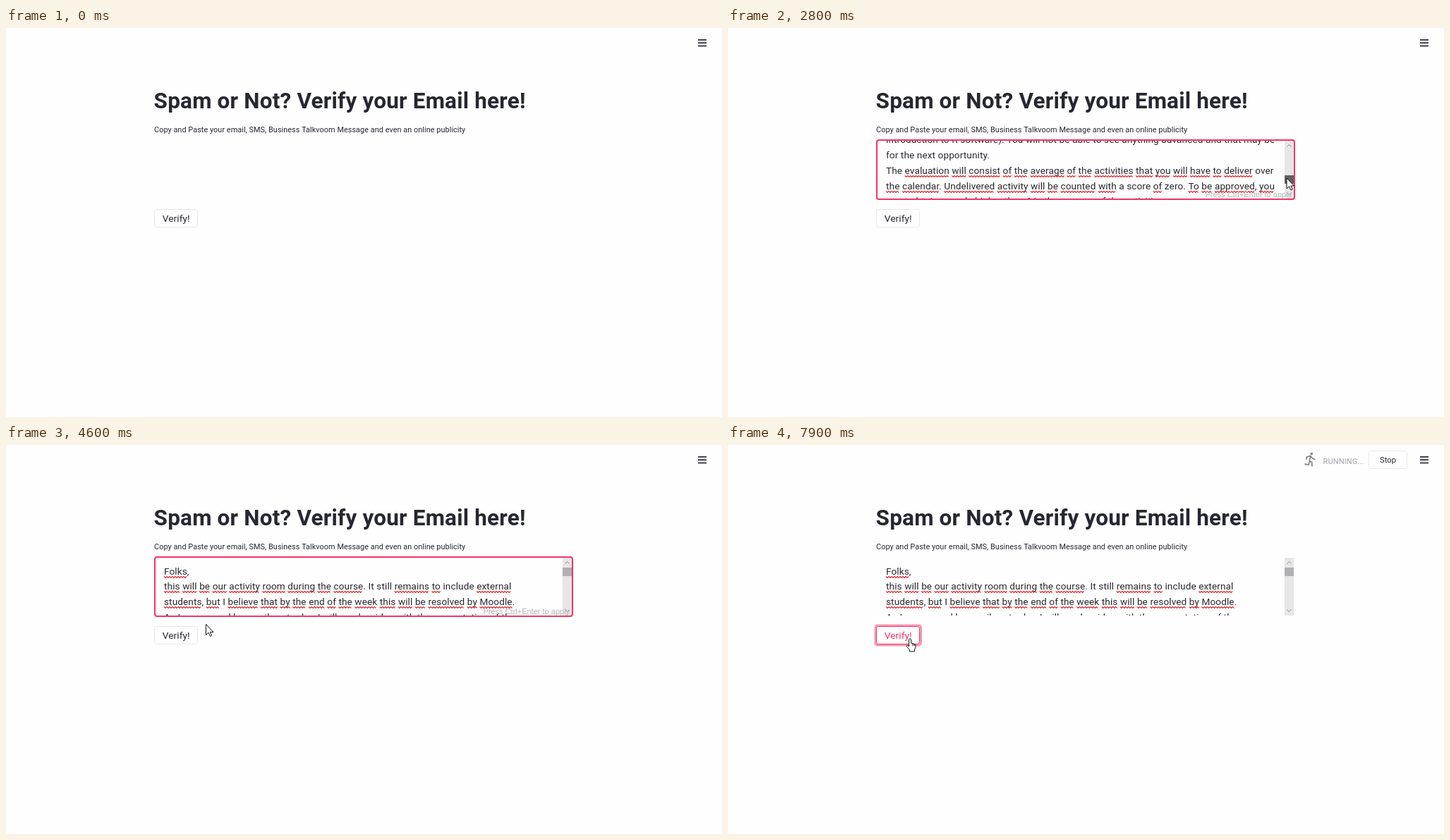
An HTML page with a canvas for the animation above (8000 ms loop, 1015 by 552 pixels).

```html
<!DOCTYPE html>
<html lang="en">
<head>
<meta charset="utf-8">
<title>Spam or Not?</title>
<style>
html, body { margin: 0; width: 100%; height: 100%; overflow: hidden; background: #fefefe; }
canvas { display: block; }
</style>
</head>
<body>
<canvas id="stage" width="1015" height="552"></canvas>
<script>
const c = document.getElementById('stage').getContext('2d');
const INK = '#262730', PINK = '#f63366', LINE = 21.76;

const lines = [
  'Folks,',
  'this will be our activity room during the course. It still remains to include external',
  'students, but I believe that by the end of the week this will be resolved by Moodle.',
  'As I announced by email yesterday, I will send a video with the presentation of the course',
  'and introduction to R.',
  'You can watch it whenever you like and write your questions in the class forum.',
  'The meetings will take place online every Thursday and the recordings will be kept',
  'in the same room until the end of the term.',
  'Remember that this is a short course, with a small number of hours, and the topics',
  'were chosen for those who are taking their first steps (basic statistics and an',
  'introduction to R software). You will not be able to see anything advanced and that may be',
  'for the next opportunity.',
  'The evaluation will consist of the average of the activities that you will have to deliver over',
  'the calendar. Undelivered activity will be counted with a score of zero. To be approved, you',
  'must obtain a grade higher than 6 in the average of the activities.',
  'I send news throughout the week'
];
const known = new Set(['I', 'a', 'R', '6', 'The', 'It', 'still', 'include', 'over', 'score', 'zero']);

// Key rows: time, then values
const scrollKeys = [[2600, 273], [2700, 262], [2800, 238], [3000, 35], [3100, 0]];
const beamKeys = [[1800, 640, 205], [2400, 780, 218]];
const dragKeys = [[2500, 789, 219], [2700, 791, 217], [2800, 792, 213], [3000, 797, 181], [3100, 797, 176]];
const textKeys = [[3500, 440, 212], [3900, 412, 224], [4000, 412, 224], [4100, 411, 206], [4400, 310, 235]];
const clickKeys = [[4600, 283.5, 254.5], [4900, 268, 272], [5100, 262, 276], [5400, 257.5, 274]];

// Icons on a 24 unit grid: head position and limbs
const icons = {
  pool: { head: [16.5, 7], d: 'M5 14l6-5.5L8 5.5l-3 1M10 8l6 6M2 16.5q1.7-1.5 3.3 0t3.4 0 3.3 0 3.3 0 3.4 0 3.3 0M2 20.5q1.7-1.5 3.3 0t3.4 0 3.3 0 3.3 0 3.4 0 3.3 0' },
  row: { head: [15, 3], d: 'M5 19.8L8.7 16h2M7 11.4q3.5-.2 5.5-2.6L15 7v7M15.5 8v6l-4-2M8 11l8.5 8h1.5l2 2-2 2-2-2.2v-2' },
  chair: { head: [12, 4], d: 'M18 21v-5h-6V9l2 .5q2 2.5 5 2.5M9 13a4 4 0 1 0 5 5.5' },
  open: { head: [12, 4], d: 'M3 8h18M10 8v14M14 8v14M12 8v7' },
  bike: { head: [15.5, 3.5], d: 'M19 10h-4l-3-3.2-4 4 4 3.2v5M9 17a4 4 0 1 0-8 0 4 4 0 1 0 8 0M23 17a4 4 0 1 0-8 0 4 4 0 1 0 8 0' },
  run: { head: [13.5, 3.5], d: 'M6 12.5V8.7L12 6.8 10.3 14.5l3.7 2V23M10.5 14.5L9 20.3l-6-1.2M12.5 7.5q2 4 6.5 4.3' }
};
const sport = [[5800, 'pool'], [5900, 'row'], [6100, 'chair'], [6300, 'open'], [6500, 'bike'], [6800, 'run'],
  [7000, 'pool'], [7100, 'row'], [7300, 'chair'], [7500, 'open'], [7700, 'bike'], [7900, 'run']];

function at(keys, t) {
  if (t <= keys[0][0]) return keys[0].slice(1);
  const i = keys.findIndex(k => k[0] > t);
  if (i < 0) return keys[keys.length - 1].slice(1);
  const a = keys[i - 1], b = keys[i], p = (t - a[0]) / (b[0] - a[0]);
  return a.slice(1).map((v, j) => v + (b[j + 1] - v) * p);
}

const ramp = (t, from, to) => Math.max(0, Math.min(1, (t - from) / (to - from)));

function setFont(size, weight = 400, spacing = 0, family = 'Roboto') {
  c.font = `${weight} ${size}px ${family}, sans-serif`;
  c.letterSpacing = spacing + 'px';
}

function write(s, x, y, color = INK) {
  c.fillStyle = color;
  c.fillText(s, x, y);
}

function box(x, y, w, h, stroke, width = 1, fill) {
  c.beginPath();
  c.roundRect(x, y, w, h, 3);
  if (fill) { c.fillStyle = fill; c.fill(); }
  c.strokeStyle = stroke;
  c.lineWidth = width;
  c.stroke();
}

function rect(x, y, w, h, color) {
  c.fillStyle = color;
  c.fillRect(x, y, w, h);
}

function shape(x, y, d, fill, stroke, width) {
  const p = new Path2D(d);
  c.save();
  c.translate(x, y);
  c.lineJoin = 'round';
  if (fill) { c.fillStyle = fill; c.fill(p); }
  c.strokeStyle = stroke;
  c.lineWidth = width;
  c.stroke(p);
  c.restore();
}

const arrow = ([x, y]) => shape(x, y, 'M0 0V15L3.5 11.7 6 17 8.2 16 5.9 11H10.5Z', '#fff', '#111', 1);
const beam = ([x, y]) => shape(x, y, 'M-3-8H3M0-8V8M-3 8H3', null, '#222', 1);
const hand = ([x, y]) => shape(x - 5, y, 'M4 12V2Q5.5-.5 7 2V7L12 8.5Q14 9 13.5 13L12 16V19H5V17L.7 11.5Q1 9.5 2.5 10.5ZM9.5 8V11M11.7 8.7V11', '#fff', '#111', 1);

function squiggle(x, y, w) {
  c.beginPath();
  c.moveTo(x, y);
  for (let i = 2; i <= w; i += 2) c.lineTo(x + i, y + (i % 4 ? 2 : 0));
  c.strokeStyle = '#e3222b';
  c.lineWidth = 1.1;
  c.stroke();
}

function misspelt(row, x, t) {
  if (row >= 12) return t >= 1800;
  if (row > 4) return false;
  return t >= (row < 2 || (row === 2 && x < 180) ? 3000 : 3100);
}

function message(t, scroll) {
  c.save();
  c.beginPath();
  c.rect(212, 160, 577, 82);
  c.clip();
  setFont(13.6, 400, 0.1);
  lines.forEach((line, row) => {
    const y = Math.round(183.7 + row * LINE - scroll);
    if (y < 150 || y > 262) return;
    write(line, 224, y);
    for (const m of line.matchAll(/\w+/g)) {
      const x = c.measureText(line.slice(0, m.index)).width;
      if (!known.has(m[0]) && misspelt(row, x, t)) squiggle(224 + x, y + 2.5, c.measureText(m[0]).width);
    }
  });
  if (t < 2700 && (t - 1600) % 1000 < 500) rect(428, 224, 1, 18, '#111');
  c.restore();
}

function scrollbar(t, scroll) {
  rect(789, 160, 13, 82, '#e6e6e6');
  rect(789, Math.round(174 + scroll * 0.149), 13, 12, t >= 2700 && t < 3500 ? '#606062' : '#b0b0b4');
  shape(795.5, 167, 'M-3 1.5L0-1.5 3 1.5', null, '#88888c', 1);
  shape(795.5, 235, 'M-3-1.5L0 1.5 3-1.5', null, '#88888c', 1);
}

function status(t) {
  c.globalAlpha = 0.5 + 0.5 * ramp(t, 5700, 6200);
  const icon = icons[sport.filter(s => s[0] <= t).pop()[1]];
  c.save();
  c.translate(814.6, 9);
  c.scale(0.94, 0.94);
  shape(0, 0, icon.d, null, '#88898d', 2);
  c.beginPath();
  c.arc(...icon.head, 2, 0, 7);
  c.fillStyle = '#88898d';
  c.fill();
  c.restore();
  setFont(11, 400, 0.13);
  write('RUNNING...', 843.5, 26.5, '#a2a3a9');
  c.globalAlpha = 1;
  box(908.5, 8.5, 54, 25, '#e6e8f0');
  setFont(11.3);
  write('Stop', 924, 25);
}

function verify(t) {
  const hot = t >= 4900, clicked = t >= 5800;
  if (clicked) box(209, 256, 64.5, 28, 'rgba(246,51,102,.5)', 3);
  const fill = clicked ? 0.35 * (1 - ramp(t, 5900, 6100)) : 0;
  box(210.5, 257.5, 61, 25, hot ? PINK : '#e6e8f0', 1, `rgba(246,51,102,${fill})`);
  setFont(13.6, 400, 0.1);
  write('Verify!', 221.8, 275, hot ? PINK : INK);
}

function pointer(t) {
  if (t >= 200 && t < 300) arrow([117.5, 105]);
  else if (t >= 1800 && t < 2500) beam(at(beamKeys, t));
  else if (t >= 2500 && t < 3500) arrow(at(dragKeys, t));
  else if (t >= 3500 && t < 4600) beam(at(textKeys, t));
  else if (t >= 4600) (t < 4900 ? arrow : hand)(at(clickKeys, t));
}

function draw(t) {
  rect(0, 0, 1015, 552, '#fefefe');
  for (const y of [16, 20.3, 24.6]) rect(981, y, 12, 1.7, INK);

  setFont(31.5, 700, 0.18);
  write('Spam or Not? Verify your Email here!', 209.6, 114.3);
  setFont(10.9, 400, 0.04);
  write('Copy and Paste your email, SMS, Business Talkvoom Message and even an online publicity', 210, 148);

  const focus = t < 5800 ? ramp(t, 600, 800) : 0.18 * ramp(t, 6000, 5900);
  if (t >= 800 && t < 1300) rect(224, 170, 1, 18, '#111');
  if (t >= 1600) {
    const [scroll] = at(scrollKeys, t);
    message(t, scroll);
    scrollbar(t, scroll);
    if (t < 5800) {
      setFont(11, 400, 0, 'Liberation Sans');
      write('Press Ctrl+Enter to apply', 676.5, 239.5, '#b2b3b9');
    }
  }
  if (focus > 0) box(211, 159, 592, 84, `rgba(246,51,102,${focus})`, 2);
  verify(t);
  if (t >= 5800) status(t);
  pointer(t);
}

function tick() {
  draw(Math.floor(performance.now() % 8000 / 100) * 100);
  requestAnimationFrame(tick);
}
tick();
</script>
</body>
</html>
```
